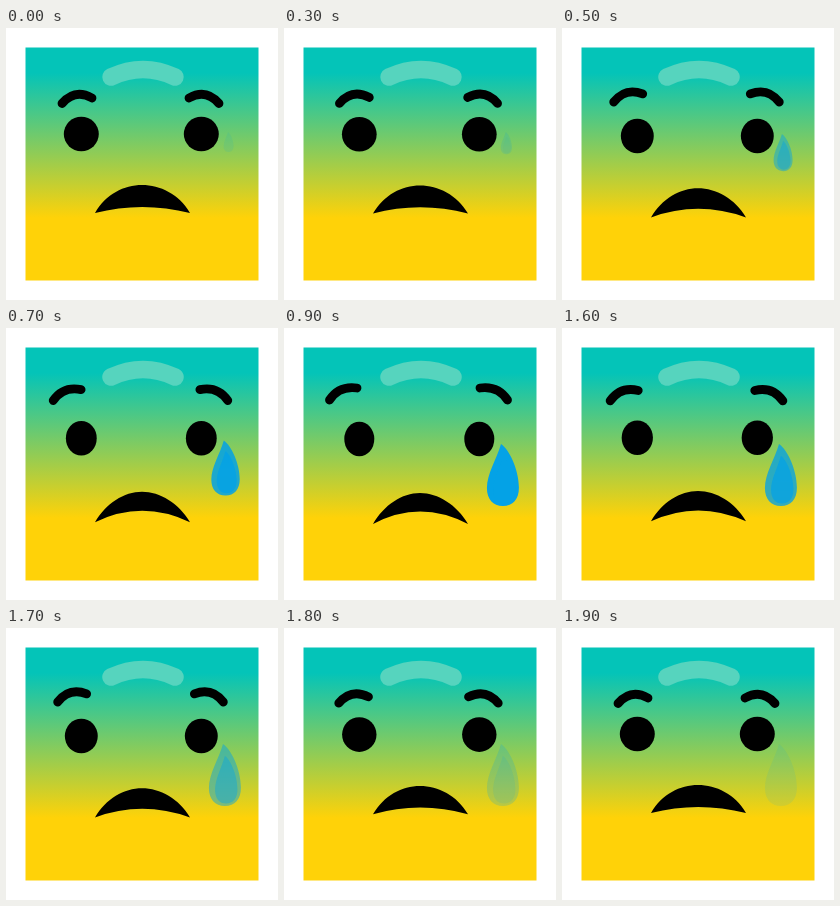
An HTML page for the animation above (2.1 s loop, 272 by 272 pixels).

```html
<!DOCTYPE html>
<html lang="en">
<head>
<meta charset="utf-8">
<title>Anxious square face</title>
<style>
  html, body { margin: 0; width: 100%; height: 100%; overflow: hidden; background: #fff; }
  svg { display: block; width: 100%; height: 100%; }
  .line { fill: none; stroke-linecap: round; }
  .brow { stroke: #000; stroke-width: 8.8; }
</style>
</head>
<body>
<svg viewBox="0 0 272 272">
  <defs>
    <linearGradient id="skin" gradientUnits="userSpaceOnUse" x1="0" y1="45" x2="0" y2="190">
      <stop offset="0" stop-color="#04c4b8"/>
      <stop offset="1" stop-color="#ffd208"/>
    </linearGradient>
    <!-- unit tear: tip at the origin, one unit wide and one unit high -->
    <path id="drop" d="M0 0C.28 .1 .56 .43 .56 .7C.56 .89 .37 1 .06 1C-.25 1 -.44 .89 -.44 .71C-.44 .48 -.15 .26 0 0Z"/>
  </defs>
  <rect x="19.5" y="19.5" width="233" height="233" fill="url(#skin)"/>
  <path class="line" d="M105 49Q137 34 169 49" stroke="#56d4be" stroke-width="17.5"/>
  <path id="browL" class="line brow"/>
  <path id="browR" class="line brow"/>
  <ellipse id="eyeL"/>
  <ellipse id="eyeR"/>
  <path id="mouth"/>
  <g id="tear" fill="#04a2e6">
    <use id="outer" href="#drop"/>
    <use id="inner" href="#drop" transform="translate(.06 .19) scale(.7 .77)"/>
  </g>
</svg>
<script>
const LOOP = 2100, STEP = 100;
const $ = id => document.getElementById(id);
const mix = (a, b, p) => a + (b - a) * p;

// eased progress from 0 to 1 over a span of time
function ease(t, from, span) {
  const u = Math.min(1, Math.max(0, (t - from) / span));
  return (1 - Math.cos(Math.PI * u)) / 2;
}

function set(id, attrs) {
  for (const key in attrs) $(id).setAttribute(key, attrs[key]);
}

function brow(p, flip) {
  const x = v => flip ? 269 - v : v;
  return `M${x(mix(56, 45.5, p))} ${mix(75.5, 72, p)}` +
    `Q${x(mix(69, 55, p))} ${mix(60.5, 57.5, p)} ${x(mix(86, 73, p))} ${mix(70, 60, p)}`;
}

function mouth(p) {
  const y = mix(185, 196, p), top = mix(157, 165, p);
  return `M89 ${y}C100 ${y - 19} 118 ${top} 136 ${top}S173 ${y - 19} 184 ${y}` +
    `Q136 ${mix(173, 171, p)} 89 ${y}Z`;
}

function draw(time) {
  const t = Math.floor(time / STEP) * STEP;
  const grow = ease(t, 200, 680);
  const sad = grow - ease(t, 1450, 450);

  const eye = { cy: mix(106, 111, sad), rx: mix(17.5, 15, sad), ry: 17.3 };
  set('eyeL', { cx: 75.3, ...eye });
  set('eyeR', { cx: 195.3, ...eye });
  set('browL', { d: brow(sad, false) });
  set('browR', { d: brow(sad, true) });
  set('mouth', { d: mouth(sad) });

  // the tear grows as it appears, then fades at full size
  const x = mix(222, 217, grow), y = mix(104, 116, grow * grow);
  set('tear', { transform: `translate(${x} ${y}) scale(${mix(10, 32, grow)} ${mix(20, 62, grow)})` });
  set('outer', { opacity: mix(.1, 1, sad) });
  set('inner', { opacity: sad });
}

const start = performance.now();
function tick() {
  draw((performance.now() - start) % LOOP);
  requestAnimationFrame(tick);
}
tick();
</script>
</body>
</html>
```
